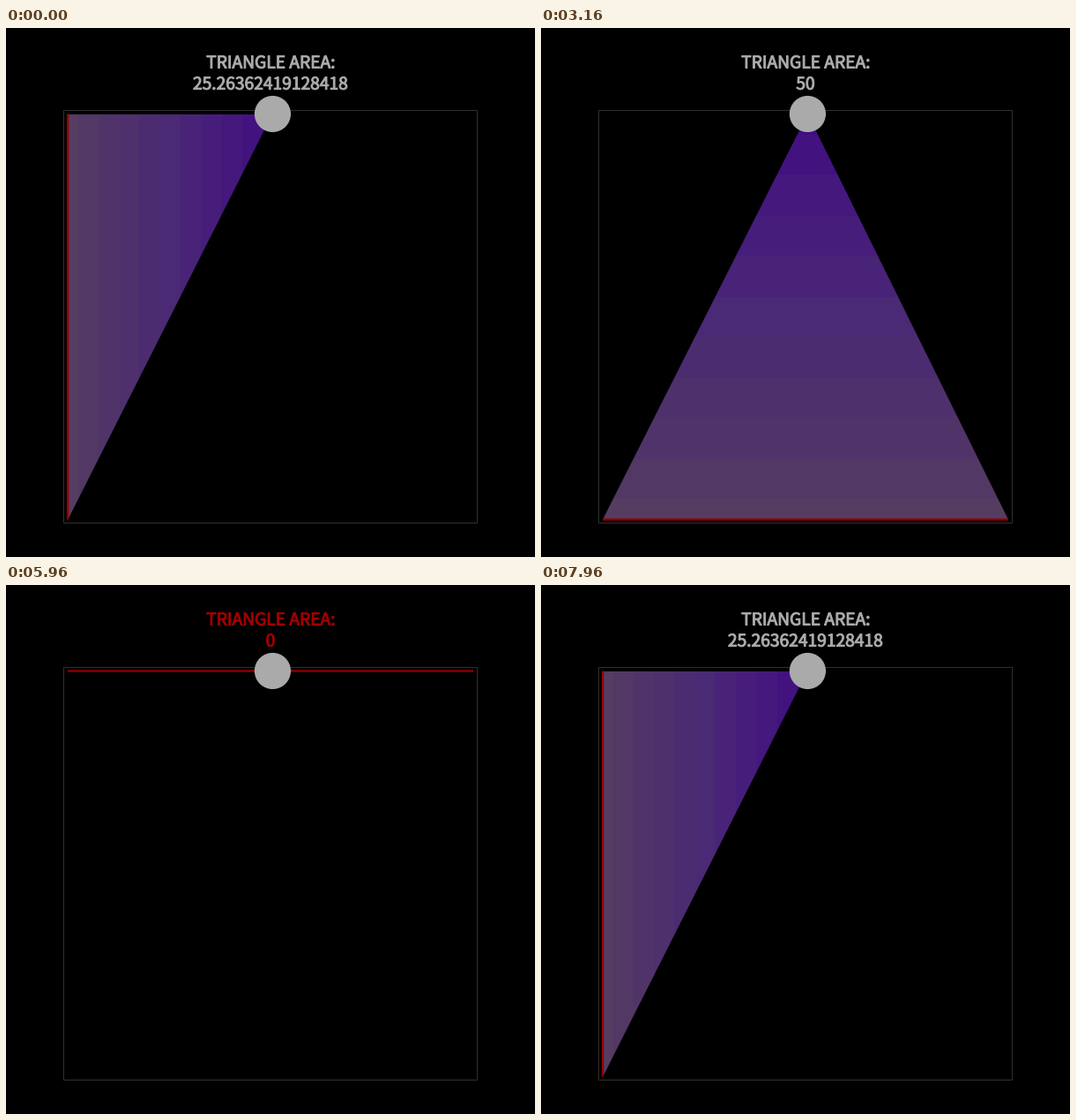
Animation of 600 by 600 pixels, one loop 8000 ms. Source, as a matplotlib script:

```python
import numpy as np
import matplotlib.pyplot as plt
from matplotlib.animation import FuncAnimation
from matplotlib.patches import Circle, Polygon, Rectangle
from matplotlib.patheffects import Normal, Stroke

SIZE, DPI = 600, 100
PX = 72 / DPI  # points per pixel
LEFT, RIGHT, TOP, BOTTOM = 70, 530, 97.5, 557.5
LEFT_AREA = 25.26362419128418
APEX = (LEFT + (RIGHT - LEFT) * LEFT_AREA / 50, TOP)

GRAY, RED, LINE_RED = "#aaaaaa", "#a00000", "#900000"
STOPS = np.array([(64, 13, 130), (74, 41, 117), (85, 60, 97)]) / 255
BANDS = 10

TL, TR, BR, BL = (LEFT, TOP), (RIGHT, TOP), (RIGHT, BOTTOM), (LEFT, BOTTOM)
SIDES = [
    (TL, BL, f"{LEFT_AREA:.14f}"),
    (BL, BR, "50"),
    (TR, BR, f"{50 - LEFT_AREA:.14f}"),
    (TL, TR, "0"),
]

fig = plt.figure(figsize=(SIZE / DPI, SIZE / DPI), dpi=DPI, facecolor="black")
ax = fig.add_axes([0, 0, 1, 1])
ax.axis("off")


def shade(a, b):
    """Banded gradient from the apex to the base a-b, None for a flat triangle."""
    if a[1] == b[1] == APEX[1]:
        return None
    axis = 0 if a[0] == b[0] else 1
    pixels = np.meshgrid(np.arange(SIZE) + 0.5, np.arange(SIZE) + 0.5)[axis]
    t = np.clip((pixels - APEX[axis]) / (a[axis] - APEX[axis]), 0, 1)
    t = np.round(t * BANDS) / BANDS
    return np.stack([np.interp(t, (0, 0.5, 1), c) for c in STOPS.T], axis=-1)


def label(y):
    return ax.text(300, y, "", ha="center", va="baseline",
                   family="Noto Sans CJK JP", size=19.2 * PX, zorder=5)


def set_label(text, string, color):
    text.set_text(string)
    text.set_color(color)
    text.set_path_effects([Stroke(linewidth=PX, foreground=color), Normal()])


shades = [shade(a, b) for a, b, _ in SIDES]
fill = ax.imshow(shades[0], extent=(0, SIZE, SIZE, 0), interpolation="nearest")
ax.set_aspect("auto")
ax.set_xlim(0, SIZE)
ax.set_ylim(SIZE, 0)

ax.add_patch(Rectangle((65.5, 93.5), 469, 468, fill=False, ec="#303030", lw=PX,
                       snap=False, zorder=1))
base, = ax.plot([], [], color=LINE_RED, lw=2.4 * PX, solid_capstyle="butt",
                snap=False, zorder=3)
ax.add_patch(Circle(APEX, 20.6, color=GRAY, lw=0, zorder=4))
title, value = label(45.5), label(69.6)


def draw(i):
    side = (i + 1) // 50 % 4
    a, b, area = SIDES[side]
    color = RED if area == "0" else GRAY
    set_label(title, "TRIANGLE AREA:", color)
    set_label(value, area, color)
    base.set_data(*zip(a, b))
    fill.set_visible(shades[side] is not None)
    if fill.get_visible():
        fill.set_data(shades[side])
        fill.set_clip_path(Polygon([APEX, a, b], transform=ax.transData))
    return fill, base, title, value


anim = FuncAnimation(fig, draw, frames=200, interval=40, repeat=True, repeat_delay=0)
plt.show()
```
